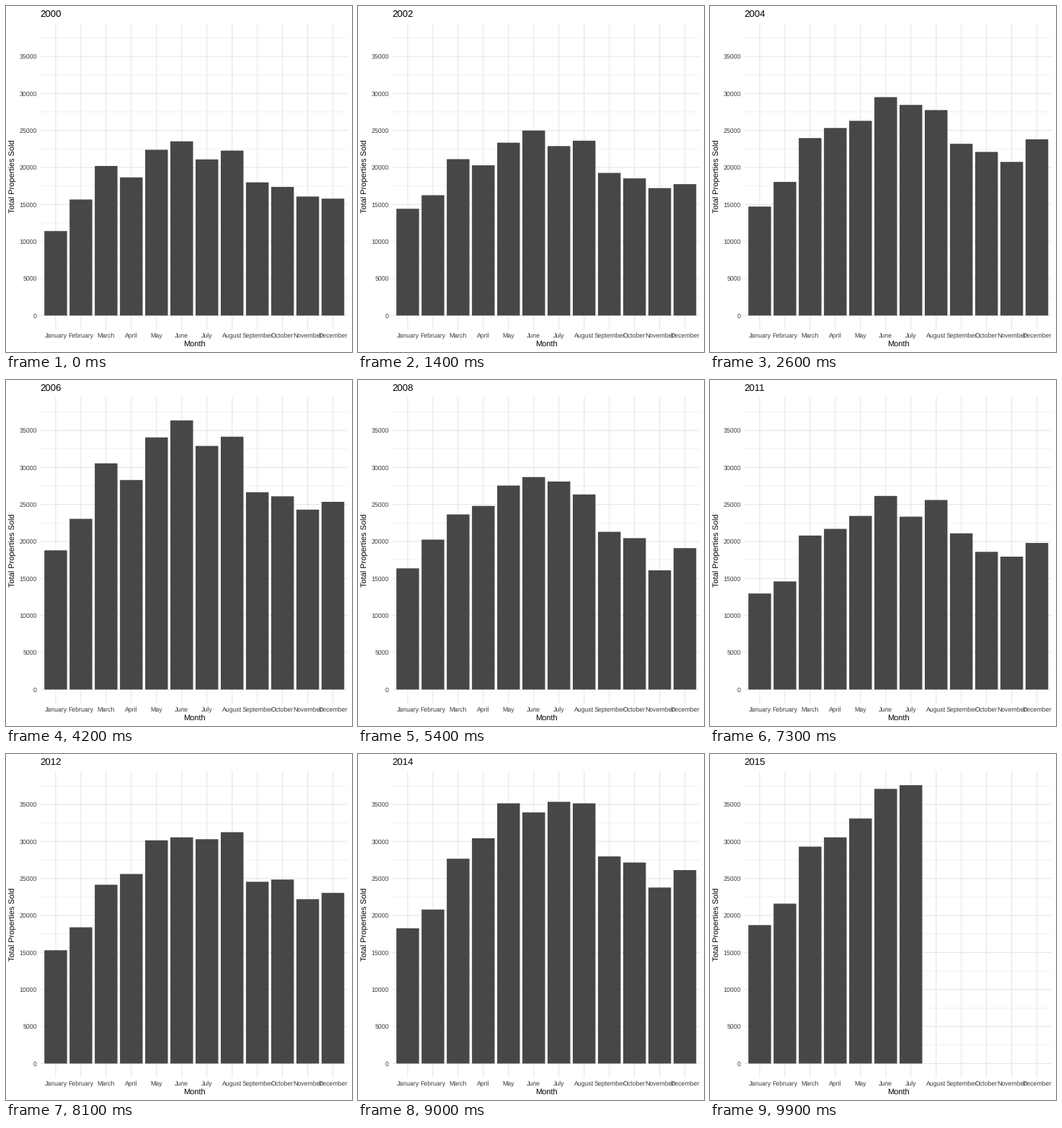
These frames come from a looping animation (480 px wide and 480 px high, 10 s). A matplotlib script:

```python
import matplotlib.pyplot as plt
import numpy as np
from matplotlib.animation import FuncAnimation
from matplotlib.patches import Rectangle

SIZE, DPI = 480, 96
FRAMES, INTERVAL = 100, 100
PT = 72 / DPI

LEFT, RIGHT, TOP, BOTTOM = 48, 474.5, 23.7, 448.7
STEP = (RIGHT - LEFT) / 12.2
BASE, SCALE = 429.4, 0.01027

BAR, GRID, TICK = "#474747", "#e5e5e5", "#3a3a3a"
MONTHS = ["January", "February", "March", "April", "May", "June", "July",
          "August", "September", "October", "November", "December"]

# Monthly sales in thousands
SALES = {
    2000: [11.41, 15.67, 20.20, 18.66, 22.39, 23.53,
           21.09, 22.28, 17.99, 17.37, 16.07, 15.79],
    2004: [14.72, 18.05, 23.97, 25.33, 26.30, 29.50,
           28.45, 27.75, 23.20, 22.10, 20.75, 23.80],
    2006: [19.00, 23.38, 31.08, 28.50, 34.58, 37.52,
           32.95, 34.83, 28.23, 27.25, 25.65, 27.23],
    2007: [18.40, 22.40, 29.50, 27.90, 33.00, 34.00,
           32.80, 32.80, 23.50, 23.80, 21.60, 21.60],
    2008: [17.17, 21.18, 24.44, 25.56, 28.36, 28.92,
           28.34, 26.74, 21.04, 19.96, 15.05, 19.06],
    2009: [12.35, 15.60, 19.70, 21.00, 23.50, 27.60,
           26.90, 24.40, 22.60, 22.90, 21.35, 19.30],
    2010: [12.30, 15.20, 22.40, 26.40, 27.70, 27.20,
           20.00, 19.80, 17.80, 17.00, 16.30, 19.90],
    2011: [12.97, 14.60, 20.80, 21.70, 23.45, 26.15,
           23.35, 25.60, 21.10, 18.60, 17.95, 19.80],
    2012: [14.29, 17.64, 23.01, 23.96, 28.49, 29.53,
           28.62, 30.03, 23.45, 24.19, 21.80, 22.07],
    2013: [17.83, 20.30, 27.00, 29.70, 34.30, 33.10,
           34.50, 34.30, 27.30, 26.50, 23.20, 25.50],
    2015: [18.70, 21.60, 29.30, 30.55, 33.10, 37.10, 37.60],
}


def blend(a, b, weight, january):
    row = (1 - weight) * np.array(SALES[a]) + weight * np.array(SALES[b])
    row[0] = january
    return row


SALES[2001] = blend(2000, 2004, 0.15, 12.70)
SALES[2002] = blend(2000, 2004, 0.20, 14.45)
SALES[2003] = blend(2000, 2004, 0.51, 14.24)
SALES[2005] = blend(2004, 2006, 0.50, 16.09)
SALES[2014] = 1.037 * np.array(SALES[2013])

YEARS = np.arange(2000, 2016)
KEYS = np.rint((YEARS - 2000) * (FRAMES - 1) / 15)


def y_at(value):
    return BASE - SCALE * value


def x_at(month):
    return LEFT + STEP * (month + 0.6)


def height(month, frame):
    """Linear between years; a month with no later data drops out at once."""
    years = [y for y in YEARS if month < len(SALES[y])]
    keys = KEYS[:len(years)]
    if frame > keys[-1]:
        return 0
    return SCALE * 1000 * np.interp(frame, keys, [SALES[y][month] for y in years])


plt.rcParams.update({"font.family": "Liberation Sans", "text.hinting": "none"})
fig = plt.figure(figsize=(SIZE / DPI, SIZE / DPI), dpi=DPI, facecolor="white")
ax = fig.add_axes([0, 0, 1, 1])
ax.set_xlim(0, SIZE)
ax.set_ylim(SIZE, 0)
ax.axis("off")


def label(x, y, text, size, color="black", ha="center", **kw):
    return ax.text(x, y, text, fontsize=size * PT, color=color, ha=ha,
                   va="baseline", **kw)


def rows(values, width):
    ax.hlines([y_at(v) for v in values], LEFT, RIGHT, colors=GRID,
              lw=width * PT, zorder=1).set_snap(False)


rows(range(2500, 40000, 5000), 0.53)
rows(range(0, 40000, 5000), 1.07)
ax.vlines([x_at(m) for m in range(12)], TOP, BOTTOM, colors=GRID,
          lw=1.07 * PT, zorder=1).set_snap(False)

bars = []
for m, name in enumerate(MONTHS):
    bar = Rectangle((x_at(m) - 0.45 * STEP, BASE), 0.9 * STEP, 0,
                    fc=BAR, lw=0, zorder=2, snap=False)
    bars.append(ax.add_patch(bar))
    label(x_at(m), 460, name, 8.8, TICK)

for v in range(0, 40000, 5000):
    label(43, y_at(v) + 3.2, str(v), 8.8, TICK, ha="right")

label((LEFT + RIGHT) / 2, 472.8, "Month", 11)
label(13.2, (TOP + BOTTOM) / 2, "Total Properties Sold", 11,
      rotation=90, rotation_mode="anchor")
title = label(LEFT - 0.2, 15, "", 13.2, ha="left")


def update(frame):
    title.set_text(str(round(2000 + 15 * frame / (FRAMES - 1))))
    for m, bar in enumerate(bars):
        bar.set_height(-height(m, frame))
    return [title, *bars]


anim = FuncAnimation(fig, update, frames=FRAMES, interval=INTERVAL,
                     repeat=True, repeat_delay=0)
plt.show()
```
